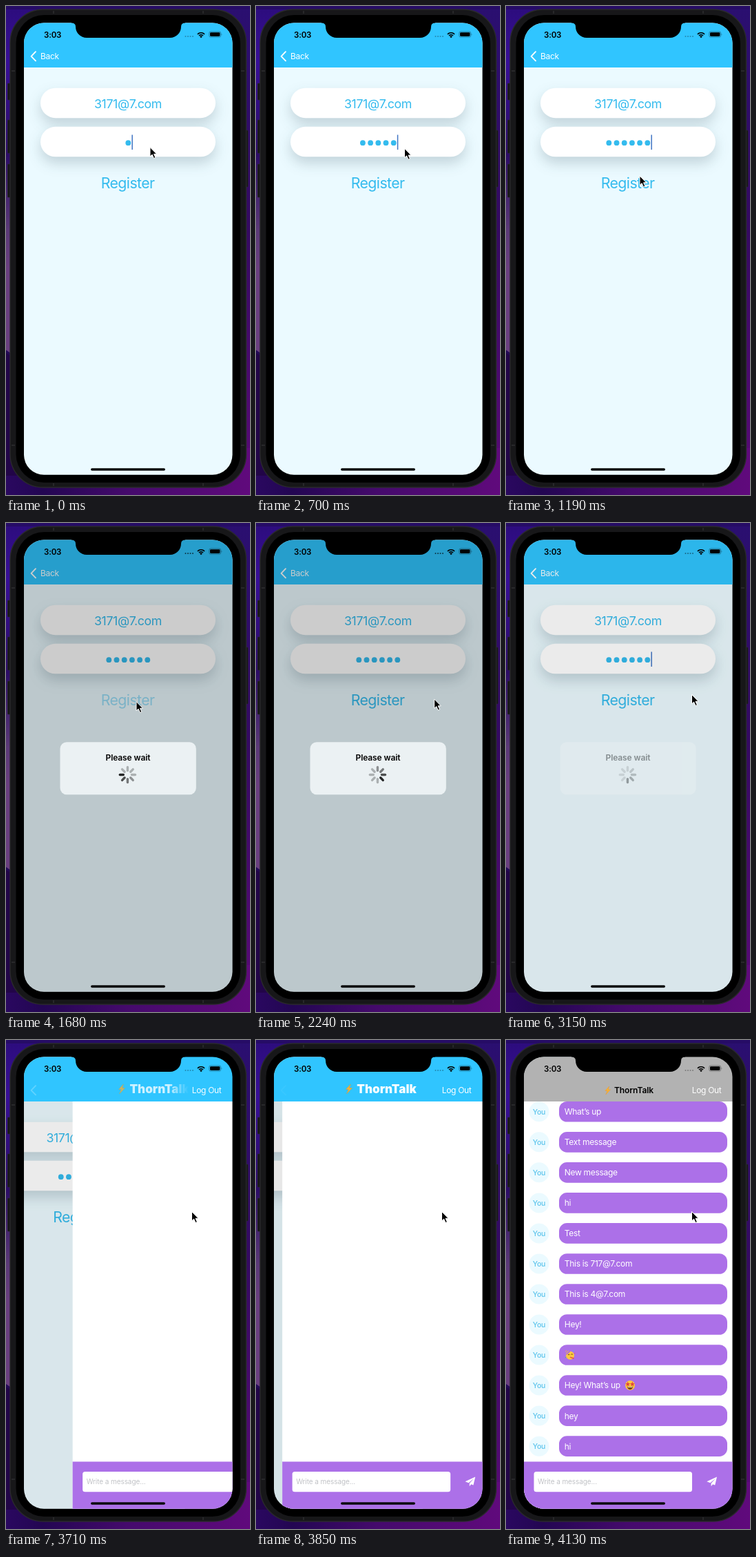
An HTML page for the animation above (4480 ms loop, 354x708 px).

```html
<!DOCTYPE html>
<html lang="en">
<head>
<meta charset="utf-8">
<title>Chat sign-up</title>
<style>
  html, body { margin: 0; width: 100%; height: 100%; overflow: hidden; background: #240a58; }
  svg { display: block; width: 354px; height: 708px; }
  text { font: 12px Inter, "Noto Sans", sans-serif; letter-spacing: -0.3px; }
  .mid { text-anchor: middle; }
  .brand { fill: #34bbee; }
  .white { fill: #fff; }
  .semi { font-weight: 600; letter-spacing: -0.1px; }
  .email { font-size: 17.8px; letter-spacing: -0.4px; }
  .register { font-size: 21.3px; letter-spacing: -0.6px; }
  .clock { font-size: 11.6px; font-weight: 600; letter-spacing: -0.2px; }
  .heavy { font-size: 17px; font-weight: 900; letter-spacing: 0; }
  .you { font-size: 10.5px; font-weight: 500; letter-spacing: -0.2px; fill: #5cc4ec; }
  .hint { font-size: 10px; letter-spacing: -0.08px; fill: #c0c2c6; }
  .shade { fill: #12303c; fill-opacity: .19; filter: blur(9.5px); }
</style>
</head>
<body>
<svg viewBox="0 0 354 708" xmlns="http://www.w3.org/2000/svg">
  <defs>
    <clipPath id="screen"><rect x="26" y="24.5" width="302.5" height="654.3" rx="29"/></clipPath>
    <linearGradient id="leftWall" x2="0" y2="1">
      <stop offset="0" stop-color="#2c0c7c"/><stop offset=".15" stop-color="#380f98"/>
      <stop offset=".4" stop-color="#2c0c66"/><stop offset=".6" stop-color="#5b3a78"/>
      <stop offset=".7" stop-color="#6a3f80"/>
    </linearGradient>
    <linearGradient id="rightWall" x2="0" y2="1">
      <stop offset="0" stop-color="#2a0f70"/><stop offset=".45" stop-color="#350a62"/>
      <stop offset="1" stop-color="#5c0a78"/>
    </linearGradient>
    <linearGradient id="floor">
      <stop offset="0" stop-color="#2a0860"/><stop offset=".15" stop-color="#230652"/>
      <stop offset=".5" stop-color="#450a6c"/><stop offset="1" stop-color="#600a7c"/>
    </linearGradient>
    <linearGradient id="fade" gradientUnits="userSpaceOnUse" x1="236" x2="265">
      <stop offset="0" stop-color="#fff"/><stop offset="1" stop-color="#000"/>
    </linearGradient>
    <mask id="titleMask" maskUnits="userSpaceOnUse" x="90" y="50" width="175" height="40">
      <rect x="90" y="50" width="175" height="40" fill="url(#fade)"/>
    </mask>
    <path id="bolt" d="M8.4 0 1.6 7.6H5.2L2.6 14 10.6 5.6H6.8Z" fill="#f9b233" stroke="#e98f20" stroke-width=".4"/>
    <g id="party">
      <circle cx="8" cy="8.6" r="6" fill="#fcc93f"/>
      <path d="M1 1 8.6 2.6 3 8Z" fill="#b067d8"/>
      <path d="M2.6 1.4 1.7 3.4M5.6 2 2.4 6" stroke="#f5d24a" stroke-width=".9"/>
      <path d="M5 8q1.2-1.6 2.4-.2M9.4 7.4q1.2-1.5 2.4 0" fill="none" stroke="#63350f" stroke-width="1"/>
      <path d="M8 10.4 14 12.2 13 14 7.6 11.8Z" fill="#e2574c"/>
      <circle cx="12.6" cy="2" r=".9" fill="#4eb7e8"/><circle cx="14.6" cy="5.6" r=".8" fill="#e85a7a"/>
      <circle cx="1.4" cy="11.6" r=".8" fill="#62c462"/>
    </g>
    <g id="starry">
      <circle cx="7.5" cy="7.5" r="7" fill="#fcc93f"/>
      <path id="star" d="M4.2 2 5.2 4.4 7.6 4.6 5.8 6.2 6.4 8.6 4.2 7.4 2 8.6 2.6 6.2.8 4.6 3.2 4.4Z" fill="#e0483e"/>
      <use href="#star" x="6.6"/>
      <path d="M3.2 9q4.3 1.4 8.6 0-.6 4.4-4.3 4.4T3.2 9Z" fill="#6d3510"/>
      <path d="M4 9.4q3.5 1 7 0l-.3 1.2H4.4Z" fill="#fff"/>
    </g>
  </defs>

  <!-- desktop -->
  <rect width="354" height="708" fill="#240a58"/>
  <path d="M0 0H60V540L0 498Z" fill="url(#leftWall)"/>
  <rect x="177" width="177" height="708" fill="url(#rightWall)"/>
  <rect width="354" height="5" fill="#260c66"/>
  <rect y="640" width="354" height="68" fill="url(#floor)"/>
  <path d="M0 502 40 530V680H0Z" fill="#220548"/>

  <!-- phone -->
  <g fill="#161618" stroke="#29292b" stroke-width=".6">
    <rect x="2.5" y="112" width="5" height="24" rx="1"/>
    <rect x="2.5" y="165" width="5" height="48" rx="1"/>
    <rect x="2.5" y="229" width="5" height="48" rx="1"/>
    <rect x="346" y="180" width="5" height="82" rx="1"/>
  </g>
  <rect x="6" y="5" width="342.5" height="692" rx="48" fill="#171719" stroke="#2a2a2c" stroke-width="1.4"/>
  <rect x="14.5" y="13" width="325.5" height="677" rx="41" fill="#000"/>
  <path d="M8 94H13M8 636H13M341 94H346M341 636H346M69 7V11M286 7V11M69 691V695M286 691V695" stroke="#28282a" stroke-width="2"/>

  <g clip-path="url(#screen)">
    <g id="form">
      <rect x="26" y="24" width="303" height="656" fill="#ebfaff"/>
      <rect class="shade" x="50" y="128" width="254" height="43.5" rx="21.7"/>
      <rect class="shade" x="50" y="184" width="254" height="43.5" rx="21.7"/>
      <rect class="white" x="50" y="118.7" width="254" height="43.5" rx="21.7"/>
      <rect class="white" x="50" y="174.8" width="254" height="43.5" rx="21.7"/>
      <text class="mid brand email" x="177" y="148">3171@7.com</text>
      <g id="dots" class="brand"></g>
      <rect id="caret" y="186.5" width="1.5" height="21.5" fill="#3f74c4"/>
      <text id="register" class="mid brand register" x="176.6" y="263.7">Register</text>
    </g>
    <rect id="formDim" x="26" y="24" width="303" height="656" opacity="0"/>

    <g id="chat">
      <rect class="white" x="26" y="89" width="303" height="591"/>
      <g id="list"></g>
      <rect x="26" y="610.5" width="303" height="70" fill="#ac70e8"/>
      <rect class="white" x="40.5" y="625" width="229.5" height="29.3" rx="3.6"/>
      <text class="hint" x="46" y="643.4">Write a message...</text>
      <path class="white" d="M306 632.5 291.3 639.3 296.3 641.2 304 634.8 297.6 642V646.3L300 643.2 303.2 644.6Z"/>
    </g>

    <rect id="nav" x="26" y="24" width="303" height="65"/>
    <g id="back">
      <path d="M43 66.2 36.6 72.8 43 79.4" fill="none" stroke="#fff" stroke-width="1.9" stroke-linecap="round" stroke-linejoin="round"/>
      <text id="backText" class="white" x="50" y="77">Back</text>
    </g>
    <g mask="url(#titleMask)">
      <g id="bigTitle">
        <use href="#bolt" x="122" y="64"/>
        <text class="white heavy" x="139.5" y="77">ThornTalk</text>
      </g>
    </g>
    <g id="smallTitle">
      <use href="#bolt" transform="translate(142.5 67) scale(.86)"/>
      <text class="semi" x="157" y="77">ThornTalk</text>
    </g>
    <text id="logOut" class="white" x="269.7" y="77">Log Out</text>

    <text class="clock" x="55" y="45.5">3:03</text>
    <g id="signal">
      <circle cx="260.5" cy="44" r="1"/><circle cx="264" cy="44" r="1"/>
      <circle cx="267.5" cy="44" r="1"/><circle cx="271" cy="44" r="1"/>
    </g>
    <path d="M277.9 40.9A7.2 7.2 0 0 1 288.1 40.9M280 43A4.3 4.3 0 0 1 286 43" fill="none" stroke="#000" stroke-width="1.6"/>
    <path d="M281.2 44.3A2.5 2.5 0 0 1 284.8 44.3L283 46.2Z"/>
    <rect x="294.7" y="37" width="17" height="8.2" rx="2.4" fill="none" stroke="#000" stroke-opacity=".4" stroke-width=".8"/>
    <rect x="296" y="38.3" width="14.4" height="5.6" rx="1.3"/>
    <path d="M312.7 39.7q1.4 1.4 0 2.8Z" opacity=".5"/>

    <rect id="dim" x="26" y="24" width="303" height="656"/>
    <g id="alert">
      <rect x="78.5" y="317.3" width="197.3" height="76" rx="9.5" fill="#ebf1f3"/>
      <text class="mid semi" x="177" y="343.6">Please wait</text>
      <g id="spinner" transform="translate(176.4 364.5)"></g>
    </g>
    <rect x="123" y="669.2" width="108" height="3.6" rx="1.8" fill="#0a0a0a"/>
  </g>
  <path d="M95 24H260V24.5Q254 24.5 254 30A16 16 0 0 1 238 46H117A16 16 0 0 1 101 30Q101 24.5 95 24.5Z"/>

  <path id="cursor" d="M0 0V13.4L3.1 10.6 5.5 16 7.9 15 5.5 9.8H9.6Z" stroke="#fff" stroke-width="1" stroke-linejoin="round"/>
</svg>
<script>
const LOOP = 4480, TICK = 70, WIDTH = 302.5;
const PURPLE = '#ac70e8';
const $ = id => document.getElementById(id);
const show = (id, alpha) => $(id).setAttribute('opacity', alpha);
const move = (id, x, y = 0) => $(id).setAttribute('transform', `translate(${x} ${y})`);

function add(parent, tag, attrs, text) {
  const el = document.createElementNS('http://www.w3.org/2000/svg', tag);
  for (const key in attrs) el.setAttribute(key, attrs[key]);
  if (text) el.textContent = text;
  return parent.appendChild(el);
}

const unit = v => Math.min(1, Math.max(0, v));
const easeOut = (t, start, length, power = 2) => 1 - (1 - unit((t - start) / length)) ** power;

// Linear value between rows of [time, ...values]
function along(rows, t) {
  const i = rows.findIndex(row => row[0] > t);
  if (i === 0) return rows[0].slice(1);
  if (i < 0) return rows[rows.length - 1].slice(1);
  const a = rows[i - 1], b = rows[i], k = (t - a[0]) / (b[0] - a[0]);
  return a.slice(1).map((v, n) => v + (b[n + 1] - v) * k);
}

const typed = [0, 70, 280, 490, 700, 910];
const pointer = [
  [630, 209, 204.5], [770, 222, 208], [840, 226, 216], [980, 215, 232],
  [1190, 194, 246], [1400, 189, 256], [1540, 189, 258.5], [1820, 189, 258.5],
  [2100, 240, 261], [2310, 268, 252], [2450, 272, 249], [2660, 269.5, 248.5]
];
const press = [[1260, 1], [1330, .25], [1540, .25], [1680, .45], [2030, 1]];
const messages = [
  'What’s up', 'Text message', 'New message', 'hi', 'Test', 'This is 717@7.com',
  'This is 4@7.com', 'Hey!', '', 'Hey! What’s up', 'hey', 'hi'
];

messages.forEach((text, i) => {
  const y = 103.8 + i * 44.03, list = $('list');
  add(list, 'circle', { cx: 48, cy: y, r: 14.5, fill: '#ebfaff' });
  add(list, 'text', { x: 48, y: y + 3.9, class: 'mid you' }, 'You');
  add(list, 'rect', { x: 77, y: y - 14.8, width: 244, height: 29.6, rx: 11.5, fill: PURPLE });
  add(list, 'text', { x: 84.8, y: y + 4.4, class: 'white' }, text);
  if (i === 8) add(list, 'use', { href: '#party', x: 85, y: y - 8 });
  if (i === 9) add(list, 'use', { href: '#starry', x: 172.5, y: y - 7.5 });
});

const dots = typed.map(() => add($('dots'), 'circle', { cy: 198.2, r: 3.9 }));
const spokes = Array.from({ length: 8 }, (_, i) => add($('spinner'), 'rect', {
  x: -1.7, y: -12.8, width: 3.4, height: 8.4, rx: 1.7, transform: `rotate(${i * 45})`
}));

function draw(t) {
  const count = typed.filter(at => at <= t).length;
  const first = 177.3 - (count - 1) * 5.6;
  dots.forEach((dot, i) => {
    dot.setAttribute('cx', first + i * 11.2);
    dot.setAttribute('opacity', i < count ? 1 : 0);
  });
  $('caret').setAttribute('x', first + (count - 1) * 11.2 + 5.1);
  show('caret', t < 1470 || t >= 3080 ? 1 : 0);
  show('register', along(press, t)[0]);
  move('cursor', ...along(pointer, t));

  const enter = easeOut(t, 1400, 280), veil = enter - easeOut(t, 3010, 400, 2.2);
  const grow = 1 + .15 * (1 - enter);
  show('dim', .2 * veil);
  show('alert', veil);
  show('signal', .3 + .35 * veil);
  $('alert').setAttribute('transform', `translate(177 355.3) scale(${grow}) translate(-177 -355.3)`);
  const head = 6 + Math.floor((t - 1680) / 100 + .1);
  spokes.forEach((spoke, i) => {
    const age = (((head - i) % 8) + 8) % 8;
    spoke.setAttribute('opacity', [.85, .68, .5, .4][age] || .27);
  });

  const push = easeOut(t, 3500, 500, 2.67), left = 1 - push;
  const loaded = t >= 4130;
  move('form', -.3 * WIDTH * push);
  show('formDim', .1 * push);
  move('chat', WIDTH * left);
  show('chat', push > 0 ? 1 : 0);
  show('list', loaded ? 1 : 0);
  $('nav').setAttribute('fill', loaded ? '#b2b2b2' : '#30c5ff');
  show('back', left);
  show('backText', unit(1 - push * 1.6));
  show('logOut', unit(push * 1.25));
  move('bigTitle', 171 * left);
  show('bigTitle', loaded ? 0 : push);
  show('smallTitle', loaded ? 1 : 0);
}

const begin = performance.now();
function frame() {
  const t = (performance.now() - begin) % LOOP;
  draw(Math.floor(t / TICK) * TICK);
  requestAnimationFrame(frame);
}
frame();
</script>
</body>
</html>
```
